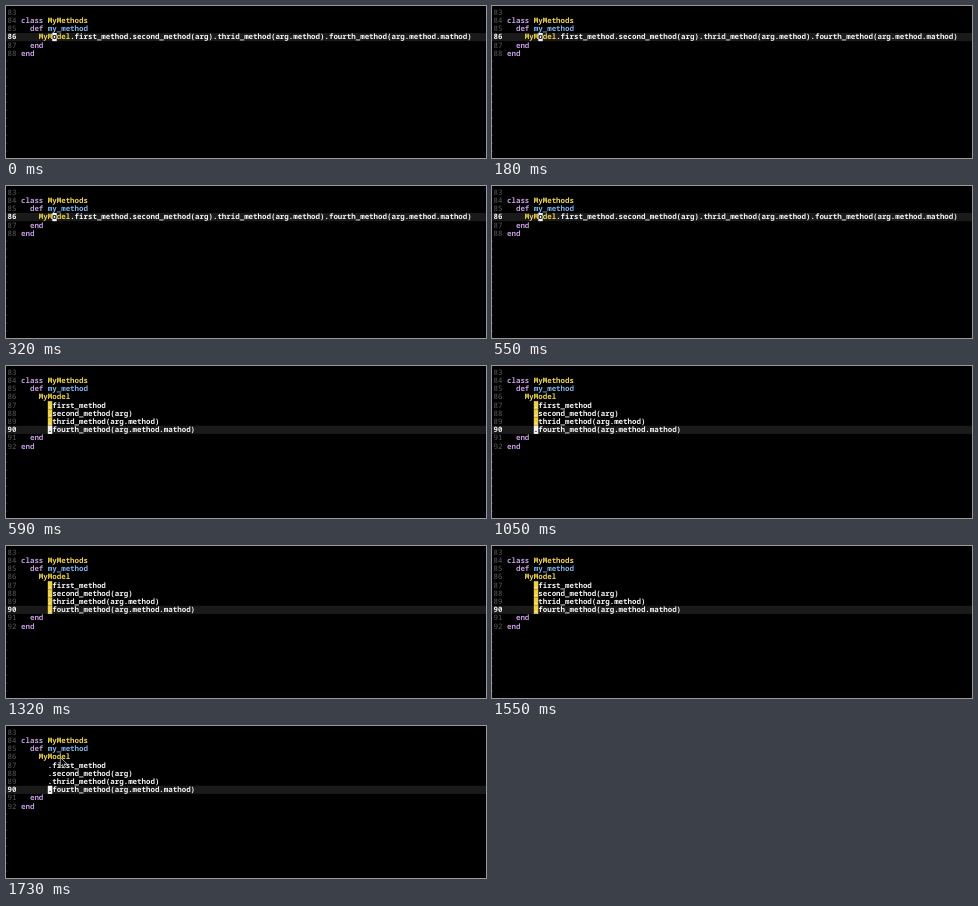
Animation, 480 px wide and 152 px high, one loop 1780 ms. Source, as an HTML page:

```html
<!DOCTYPE html>
<html lang="en">
<head>
<meta charset="utf-8">
<title>Splitting a method chain</title>
<style>
  html, body { margin: 0; width: 100%; height: 100%; overflow: hidden; background: #000; }
  svg { display: block; width: 100%; height: 100%; }
  text {
    font: 600 7.445px "Noto Sans Mono", "DejaVu Sans Mono", monospace;
    white-space: pre; text-rendering: geometricPrecision;
  }
  .num { font-weight: 400; fill: #5c5c5c; }
  .now { font-weight: 700; fill: #f2f2f2; }
  .key { fill: #c49be0; }
  .type { fill: #efd44c; }
  .name { fill: #7cb4ec; }
  .code { fill: #f4f4f4; }
  .dark { fill: #111; }
  .tilde { fill: #454545; }
</style>
</head>
<body>
<svg id="stage" viewBox="0 0 480 152"></svg>
<script>
const LOOP = 1780, SPLIT = 590, BLINK = 1180, CLEAR = 1730;
const CELL = 4.467, ROW = 8.19, LEFT = 15, FIRST = 84;
const YELLOW = '#ecd04a', WHITE = '#f6f6f6';
const stage = document.getElementById('stage');

const calls = ['.first_method', '.second_method(arg)', '.thrid_method(arg.method)',
  '.fourth_method(arg.method.mathod)'];
const colX = col => LEFT + col * CELL;
const baseY = line => 17 + (line - FIRST) * ROW;
const topY = line => baseY(line) - 6.4;

const text = (line, col, str, cls) =>
  `<text x="${colX(col)}" y="${baseY(line)}" class="${cls}">${str}</text>`;
const block = (line, col, fill) =>
  `<rect x="${colX(col)}" y="${topY(line)}" width="${CELL}" height="${ROW}" fill="${fill}"/>`;

function gutter(last, current) {
  let out = '';
  for (let n = FIRST - 1; n <= last; n++)
    out += text(n, -3, n, n === current ? 'num now' : 'num');
  for (let n = last + 1; n <= FIRST + 17; n++) out += text(n, -4, '~', 'tilde');
  return out;
}

function frame(last, current, body) {
  return `<rect width="480" height="152" fill="#000"/>
    <rect y="${topY(current)}" width="480" height="${ROW}" fill="#1a1a1a"/>` +
    gutter(last, current) +
    text(84, 0, 'class', 'key') + text(84, 6, 'MyMethods', 'type') +
    text(85, 2, 'def', 'key') + text(85, 6, 'my_method', 'name') +
    text(86, 4, 'MyModel', 'type') + body +
    text(last - 1, 2, 'end', 'key') + text(last, 0, 'end', 'key');
}

function joined() {
  return frame(88, 86, text(86, 11, calls.join(''), 'code') +
    block(86, 7, WHITE) + text(86, 7, 'o', 'dark'));
}

function split(marked, cursorOn) {
  const body = calls.map((call, i) => {
    const line = 87 + i, cursor = i === 3 && cursorOn;
    const fill = cursor ? WHITE : marked ? YELLOW : '';
    return (fill ? block(line, 6, fill) : '') +
      text(line, 6, '.', cursor ? 'dark' : 'code') +
      text(line, 7, call.slice(1), 'code');
  }).join('');
  return frame(92, 90, body);
}

const pointer = `<path d="M54.3 31.4V40.6L56.5 38.6L58 42L59.6 41.3L58.1 38H61.2Z"
  fill="#000" stroke="#ddd" stroke-width=".7"/>`;

const states = [joined(), split(true, true), split(true, false), split(false, true) + pointer];
let shown = -1;

function draw(now) {
  const t = now % LOOP;
  const state = t < SPLIT ? 0 : t < BLINK ? 1 : t < CLEAR ? 2 : 3;
  if (state !== shown) stage.innerHTML = states[shown = state];
}

const start = performance.now();
function tick() {
  draw(performance.now() - start);
  requestAnimationFrame(tick);
}
tick();
</script>
</body>
</html>
```
